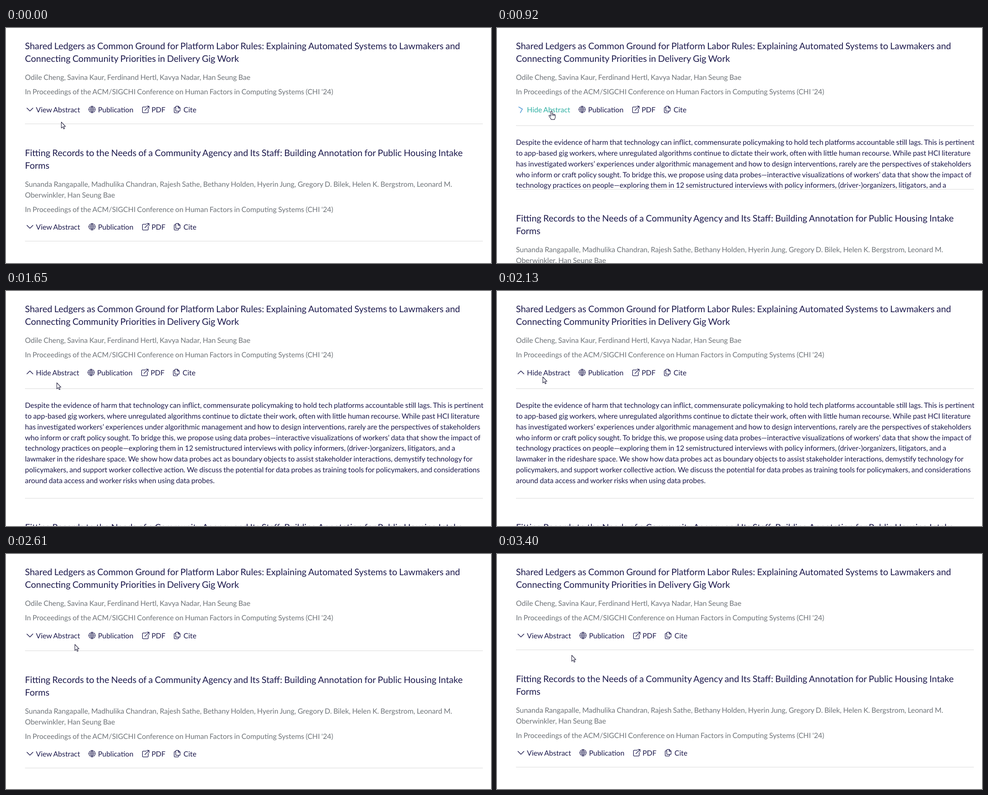
Recreate the animation shown at these times as an HTML page with a canvas. Size 1074 by 521 pixels, loop 3470 ms.

```html
<!DOCTYPE html>
<html lang="en">
<head>
<meta charset="utf-8">
<title>Publications</title>
<style>
  html, body { margin: 0; width: 100%; height: 100%; overflow: hidden; background: #fff; }
  canvas { display: block; }
</style>
</head>
<body>
<canvas id="stage" width="1074" height="521"></canvas>
<script>
const ctx = document.getElementById('stage').getContext('2d');
const W = 1074, H = 521, LEFT = 42, LOOP = 3470;
const NAVY = '#1d1a4d', GREY = '#6f7479', TEAL = '#2fb0a3', BLUE = '#4390d2', RULE = '#dadada';
const FAMILY = 'Lato, sans-serif', WORD_SPACING = -0.039; // em

// Screen-capture clock: the picture advances in steps
const STEP = 67.4, FIRST = 40;
// Abstract panel
const OPEN_AT = 821, CLOSE_AT = 2351, DURATION = 280, PANEL_Y = 212, PANEL_H = 247;

const VENUE = "In Proceedings of the ACM/SIGCHI Conference on Human Factors in Computing Systems (CHI '24)";

const first = {
  title: [
    'Shared Ledgers as Common Ground for Platform Labor Rules: Explaining Automated Systems to Lawmakers and',
    'Connecting Community Priorities in Delivery Gig Work'
  ],
  authors: ['Odile Cheng, Savina Kaur, Ferdinand Hertl, Kavya Nadar, Han Seung Bae']
};

const second = {
  title: [
    'Fitting Records to the Needs of a Community Agency and Its Staff: Building Annotation for Public Housing Intake',
    'Forms'
  ],
  authors: [
    'Sunanda Rangapalle, Madhulika Chandran, Rajesh Sathe, Bethany Holden, Hyerin Jung, Gregory D. Bilek, Helen K. Bergstrom, Leonard M.',
    'Oberwinkler, Han Seung Bae'
  ]
};

const abstract = [
  'Despite the evidence of harm that technology can inflict, commensurate policymaking to hold tech platforms accountable still lags. This is pertinent',
  'to app-based gig workers, where unregulated algorithms continue to dictate their work, often with little human recourse. While past HCI literature',
  'has investigated workers’ experiences under algorithmic management and how to design interventions, rarely are the perspectives of stakeholders',
  'who inform or craft policy sought. To bridge this, we propose using data probes—interactive visualizations of workers’ data that show the impact of',
  'technology practices on people—exploring them in 12 semistructured interviews with policy informers, (driver-)organizers, litigators, and a',
  'lawmaker in the rideshare space. We show how data probes act as boundary objects to assist stakeholder interactions, demystify technology for',
  'policymakers, and support worker collective action. We discuss the potential for data probes as training tools for policymakers, and considerations',
  'around data access and worker risks when using data probes.'
];

// Pointer path: time, x, y
const path = [
  [40, 122, 208], [300, 123, 192], [500, 122, 187], [590, 122, 187], [660, 120, 184],
  [930, 120, 184], [1118, 116, 187], [1190, 114, 193], [1310, 112, 203], [1640, 112, 203],
  [2125, 101, 190], [2180, 101, 190], [2330, 122, 182], [2480, 122, 182], [2600, 152, 200],
  [2680, 158, 210], [2810, 164, 222], [3250, 164, 222], [3340, 165, 224]
];

const shapes = {
  arrow: new Path2D('M0 0V13.4L3.1 10.6L5.2 15.3L7.3 14.4L5.2 9.8H9.3Z'),
  hand: new Path2D('M-1.6 11.5V1.4C-1.6 -.6 1.5 -.6 1.5 1.4V6.2C2 5.4 4 5.6 4.2 6.8' +
    'C5 6.1 6.4 6.6 6.6 7.6C7.4 7.1 8.7 7.7 8.7 9V13.2C8.7 15 7 16.2 7 18.4H-.6' +
    'C-.8 16.2 -3.6 13.8 -5.4 10.6C-6 9 -4.4 8.2 -3.3 9.4Z'),
  fingers: new Path2D('M1.5 6.2V9.8M4.2 6.8V10M6.6 7.6V10.2'),
  chevron: new Path2D('M-6.6 -3.2L0 3.3L6.6 -3.2'),
  globe: new Path2D('M.7 8a7.3 7.3 0 1 0 14.6 0a7.3 7.3 0 1 0 -14.6 0ZM8 .7V15.3M.7 8H15.3' +
    'M8 .7C3.4 4.2 3.4 11.8 8 15.3M8 .7C12.6 4.2 12.6 11.8 8 15.3M1.9 4.6H14.1M1.9 11.4H14.1'),
  link: new Path2D('M9 2.6H2.2Q.8 2.6 .8 4V13.8Q.8 15.2 2.2 15.2H12Q13.4 15.2 13.4 13.8V7.4' +
    'M6 10.2L15.3 .8M10.4 .8H15.3V5.8'),
  copy: new Path2D('M10.2 .7H6Q4.6 .7 4.6 2.1V10.4Q4.6 11.8 6 11.8H12.8Q14.2 11.8 14.2 10.4V4.6Z' +
    'M10 .9V4.8H14.1M4.4 3.6H2.6Q1.2 3.6 1.2 5V13.8Q1.2 15.2 2.6 15.2H9.4Q10.8 15.2 10.8 13.8V12')
};

// CSS "ease" curve
function ease(x) {
  if (x <= 0) return 0;
  if (x >= 1) return 1;
  let lo = 0, hi = 1;
  for (let i = 0; i < 24; i++) {
    const s = (lo + hi) / 2, r = 1 - s;
    if (0.75 * r * r * s + 0.75 * r * s * s + s * s * s < x) lo = s; else hi = s;
  }
  const r = 1 - lo;
  return 0.3 * r * r * lo + 3 * r * lo * lo + lo ** 3;
}

function pointerAt(t) {
  const i = path.findIndex(p => p[0] > t);
  if (i === 0) return path[0].slice(1);
  if (i < 0) return path[path.length - 1].slice(1);
  const [a, b] = [path[i - 1], path[i]];
  const k = (t - a[0]) / (b[0] - a[0]);
  return [1, 2].map(n => Math.round(a[n] + (b[n] - a[n]) * k));
}

function text(str, x, y, color, size = 16) {
  ctx.font = `${size}px ${FAMILY}`;
  ctx.wordSpacing = `${WORD_SPACING * size}px`;
  ctx.fillStyle = color;
  ctx.fillText(str, x, Math.round(y));
}

function lines(list, y, gap, color, size) {
  list.forEach((str, i) => text(str, LEFT, y + i * gap, color, size));
}

function rule(y) {
  ctx.fillStyle = RULE;
  ctx.fillRect(LEFT, y, 1014, 1);
}

function stroke(shape, x, y, color, width = 1.3, turn = 0) {
  ctx.save();
  ctx.translate(x, y);
  ctx.rotate(turn);
  ctx.strokeStyle = color;
  ctx.lineWidth = width;
  ctx.stroke(shape);
  ctx.restore();
}

function buttons(y, { open = false, color = NAVY, arrow = NAVY, turn = 0 } = {}) {
  const dx = open ? -2 : 0, top = y - 14.4;
  stroke(shapes.chevron, 53, y - 6.4, arrow, 1.4, turn);
  text(open ? 'Hide Abstract' : 'View Abstract', 66.3, y, color);
  stroke(shapes.globe, 182.5 + dx, top, NAVY, 0.95);
  text('Publication', 203.7 + dx, y, NAVY);
  stroke(shapes.link, 301.5 + dx, top, NAVY);
  text('PDF', 322.2 + dx, y, NAVY);
  stroke(shapes.copy, 371.3 + dx, top, NAVY);
  text('Cite', 393 + dx, y, NAVY);
}

function entry(item, y, state) {
  const extra = (item.authors.length - 1) * 23.8;
  lines(item.title, y, 28, NAVY, 20);
  lines(item.authors, y + 68, 24, GREY);
  text(VENUE, LEFT, y + 99.7 + extra, GREY);
  buttons(Math.round(y + 139.6 + extra), state);
}

function panel(bottom) {
  ctx.save();
  ctx.beginPath();
  ctx.rect(0, PANEL_Y, W, bottom - PANEL_Y);
  ctx.clip();
  rule(216);
  lines(abstract, 259, 23.86, NAVY);
  ctx.restore();
  rule(bottom);
}

function pointer(x, y, hover) {
  ctx.save();
  ctx.translate(x + 0.5, y + 0.5);
  ctx.fillStyle = '#fff';
  ctx.strokeStyle = '#24223f';
  ctx.lineWidth = 1.1;
  const shape = hover ? shapes.hand : shapes.arrow;
  ctx.fill(shape);
  ctx.stroke(shape);
  if (hover) ctx.stroke(shapes.fingers);
  ctx.restore();
}

function draw(time) {
  const t = time < FIRST ? 0 : FIRST + STEP * Math.floor((time - FIRST) / STEP);
  const amount = ease((t - OPEN_AT) / DURATION) - ease((t - CLOSE_AT) / DURATION);
  const open = t >= OPEN_AT && t < CLOSE_AT;
  const moving = amount > 0 && amount < 1;
  const [x, y] = pointerAt(t);
  const hover = y < 189.5;
  const color = hover ? TEAL : NAVY;
  const bottom = Math.round(PANEL_Y + PANEL_H * amount);

  ctx.fillStyle = '#fff';
  ctx.fillRect(0, 0, W, H);
  entry(first, 47, {
    open, color,
    arrow: hover && moving ? BLUE : color,
    turn: -Math.PI * amount
  });
  panel(bottom);
  entry(second, bottom + 72);
  rule(bottom + 260);
  pointer(x, y, hover);
}

ctx.textBaseline = 'alphabetic';
ctx.textRendering = 'geometricPrecision';
ctx.lineJoin = ctx.lineCap = 'round';

let start;
function tick(now) {
  start ??= now;
  draw((now - start) % LOOP);
  requestAnimationFrame(tick);
}
requestAnimationFrame(tick);
</script>
</body>
</html>
```
